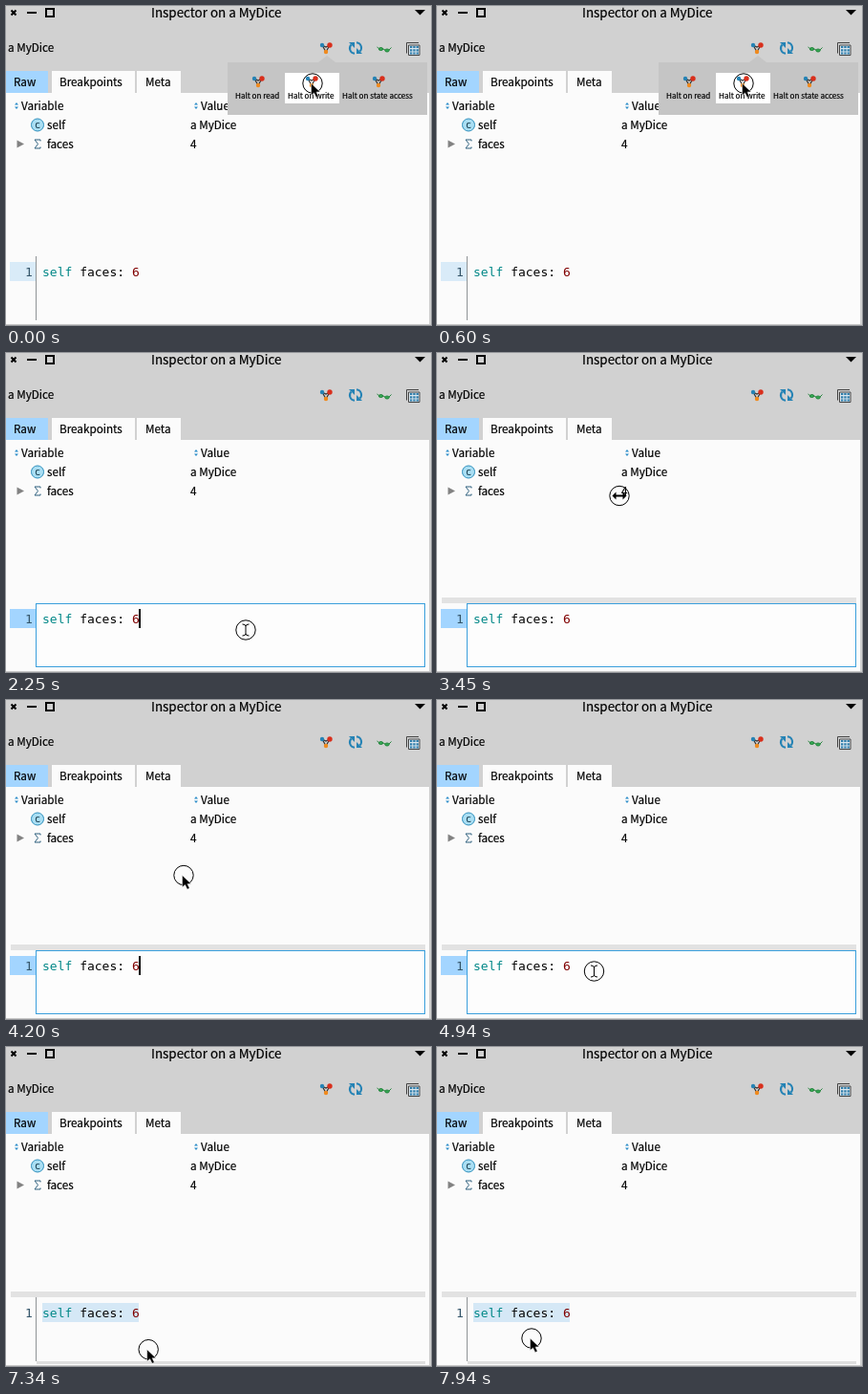
Recreate the animation shown at these times as an HTML page. Size 445 px wide and 334 px high, loop 8 s.

```html
<!DOCTYPE html>
<html lang="en">
<head>
<meta charset="utf-8">
<title>Inspector</title>
<style>
html, body { margin: 0; width: 100%; height: 100%; overflow: hidden; background: #d1d1d1; }
svg { display: block; width: 445px; height: 334px; }
text {
  font: 11.7px "Noto Sans CJK JP", "Noto Sans CJK SC", "Noto Sans CJK", "Open Sans", sans-serif;
  fill: #000; stroke: #000; stroke-width: .2px; white-space: pre;
}
text.title { font-size: 13.4px; }
text.small { font-size: 8.1px; }
text.code { font: 13px "DejaVu Sans Mono", "Noto Sans Mono", monospace; stroke: none; }
</style>
</head>
<body>
<svg viewBox="0 0 445 334">
  <defs>
    <g id="halt" fill="none">
      <path d="M-4-3 0 4 4-3M-4-3 0-1 4-3" stroke="#333" stroke-width="1.2"/>
      <circle cx="-4" cy="-3" r="2.2" fill="#2583b5"/>
      <circle cx="4" cy="-3" r="2.7" fill="#d92f1c"/>
      <circle cx="0" cy="4" r="2.2" fill="#f08a1d"/>
    </g>
    <path id="sort" d="M-2-1 0-3.500 2-1zM-2 1 0 3.500 2 1z" fill="#2f8fca"/>
    <path id="turn" d="M-1 5.800A5.500 5.500 0 0 1-4.500-3.500" fill="none" stroke="#2583b5" stroke-width="2"/>
    <path id="turnHead" d="M-7-6h6v6z" fill="#2583b5"/>
  </defs>

  <rect width="445" height="334" fill="#d1d1d1"/>
  <path d="M5.500 4.500l5 5m0-5-5 5M22 7h10" stroke="#000" stroke-width="2"/>
  <rect x="42" y="3" width="8" height="8" fill="none" stroke="#000" stroke-width="2"/>
  <path d="M428 4h11l-5.500 5.500z"/>
  <text class="title" x="152" y="12">Inspector on a MyDice</text>
  <text x="2" y="48">a MyDice</text>

  <use href="#halt" x="335" y="44"/>
  <g transform="translate(366 44)">
    <use href="#turn"/><use href="#turnHead"/>
    <g transform="rotate(180)"><use href="#turn"/><use href="#turnHead"/></g>
  </g>
  <g transform="translate(396 45)" fill="#35a853" stroke="#27853f">
    <ellipse cx="-3.500" cy="0" rx="2.200" ry="1.500"/>
    <ellipse cx="3" cy="1.500" rx="2.200" ry="1.500"/>
    <path d="M-1 0 1 1M-5.500-.500l-2-1.500M5 1l2.500-2.500" fill="none"/>
  </g>
  <g transform="translate(426 44.500)" fill="none">
    <path d="M-6.500 5V-6H6" stroke="#444"/>
    <path d="M-4.500-3.500H7V7H-4.500z" fill="#d9e6ee" stroke="#444"/>
    <path d="M-3-1.500H6M-3 1.800H6M-3 5H6" stroke="#2c7ba9" stroke-width="2.200" stroke-dasharray="2.300 1"/>
  </g>

  <rect y="68" width="44" height="23" fill="#a3d5ff"/>
  <path d="M48 68h87v23H48zM137 68h46v23h-46zM0 91h443v242H0z" fill="#fbfbfb"/>
  <text x="8" y="84">Raw</text>
  <text x="56" y="84">Breakpoints</text>
  <text x="146" y="84">Meta</text>

  <rect id="row" x="5" y="135" width="434" height="20" fill="#d3d3d3"/>
  <use href="#sort" x="11" y="104.500"/>
  <use href="#sort" x="199" y="104.500"/>
  <text x="16" y="109">Variable</text>
  <text x="204" y="109">Value</text>
  <circle cx="33" cy="124.500" r="6.500" fill="#a9def3" stroke="#2d8fbd"/>
  <text class="small" x="33" y="127.700" text-anchor="middle" style="fill:#14506e">C</text>
  <text x="43" y="129">self</text>
  <text x="193" y="129">a MyDice</text>
  <path d="M11.500 140.500v8l7.500-4z" fill="#828282"/>
  <path d="M36 141.500v-1.500h-6l3.500 4.500-3.500 4.500h6v-1.500" fill="none" stroke="#2c5f7d"/>
  <text x="43" y="149">faces</text>
  <text x="193" y="149">4</text>

  <rect id="splitter" x="5" y="256" width="434" height="6" fill="#e2e2e2"/>
  <rect id="gutter" x="4" y="268" width="27" height="20"/>
  <path id="edge" d="M31.500 262v67" stroke="#8f9396"/>
  <rect id="focus" x="31.500" y="262.500" width="407" height="66" fill="#fff" fill-opacity=".4" stroke="#3a9fdc"/>
  <rect id="selection" y="268" height="20"/>
  <text class="code" x="20" y="283" style="fill:#34556a">1</text>
  <text class="code" x="38" y="283"><tspan fill="#008787">self</tspan> faces: <tspan fill="#800000">6</tspan></text>
  <rect id="caret" x="139" y="268" width="2" height="20"/>
  <rect id="bottomBar" x="32" y="329" width="407" height="3" fill="#dedede"/>
  <path d="M0 333.500h445" stroke="#c9c9c9"/>

  <g id="popup">
    <path d="M232 59h95l9-7 9 7h96v55H232z" fill="#c5c5c5"/>
    <rect id="button" x="292" y="70" width="57" height="32"/>
    <use href="#halt" x="264" y="79"/>
    <use href="#halt" x="320" y="79"/>
    <use href="#halt" x="390" y="79"/>
    <text class="small" x="240" y="97">Halt on read</text>
    <text class="small" x="295" y="97">Halt on write</text>
    <text class="small" x="352" y="97">Halt on state access</text>
  </g>

  <g id="pointer">
    <circle r="10.200" fill="none" stroke="#000"/>
    <path id="arrow" d="M-1.500 0v12.500l3-2.600 2.300 4.800 2.400-1.100-2.300-4.600h4z" stroke="#fff" stroke-width=".5"/>
    <path id="beam" d="M-3.500-6q3.500 0 3.500 2 0-2 3.500-2M0-5V5M-3.500 6q3.500 0 3.500-2 0 2 3.500 2" fill="none" stroke="#000"/>
    <path id="resize" d="M-7.500 0l4-4v3h7v-3l4 4-4 4V1h-7v3z"/>
  </g>
</svg>
<script>
const LOOP = 8000;
const STEP = 150;
const $ = id => document.getElementById(id);

const home = { x: 321, y: 81 };
const strokes = [
  { start: 1050, end: 1500, x: 304.5, y: 153 },  // leave the popup
  { start: 1500, end: 1950, x: 251, y: 290 },    // down into the editor
  { start: 2700, end: 3450, x: 191, y: 149.5 },  // up to the column edge
  { start: 3450, end: 3750, x: 198, y: 145 },
  { start: 4050, end: 4650, x: 150, y: 299 },    // back to the editor
  { start: 4650, end: 4940, x: 164.5, y: 284 },
  { start: 5090, end: 5690, x: 40, y: 284 },     // drag the selection
  { start: 5840, end: 6140, x: 69.5, y: 284 },
  { start: 7040, end: 7490, x: 189, y: 333 },    // out and back
  { start: 7490, end: 7940, x: 99, y: 305 }
];

const within = (t, from, to) => t >= from && t < to;
const show = (id, on) => $(id).setAttribute("visibility", on ? "inherit" : "hidden");

function quantize(t) {
  const shift = t < 4940 ? 0 : 140;
  return Math.floor((t - shift) / STEP) * STEP + shift;
}

function pointerAt(t) {
  return strokes.reduce((from, { start, end, x, y }) => {
    const p = Math.min(1, Math.max(0, (t - start) / (end - start)));
    return { x: from.x + (x - from.x) * p, y: from.y + (y - from.y) * p };
  }, home);
}

function pointerShape(t, y) {
  if (within(t, 3450, 3600)) return "resize";
  return within(t, 2250, 7190) && y > 262 ? "beam" : "arrow";
}

function render(t) {
  const { x, y } = pointerAt(quantize(t));
  const shape = pointerShape(t, y);
  $("pointer").setAttribute("transform", `translate(${x} ${y})`);
  for (const id of ["arrow", "beam", "resize"]) show(id, id === shape);

  show("popup", t < 2100);
  show("button", t < 1200);
  $("button").setAttribute("fill", within(t, 300, 450) ? "#dcdcdc" : "#fff");
  show("row", within(y, 135, 155) && shape === "arrow");

  const focused = within(t, 2100, 6740);
  const selecting = t >= 5240;
  show("focus", focused);
  show("edge", !focused);
  show("splitter", t >= 3000);
  show("bottomBar", t >= 6740);
  show("caret", within(t, 2100, 2850) || within(t, 3900, 4350));
  show("gutter", !selecting);
  $("gutter").setAttribute("fill", focused ? "#a3d5ff" : "#d9ebf8");

  const start = t >= 5690 ? 38 : Math.min(x, 139);
  show("selection", selecting);
  $("selection").setAttribute("x", start);
  $("selection").setAttribute("width", 139 - start);
  $("selection").setAttribute("fill", focused ? "#a3d5ff" : "#d5e8f6");
}

function tick() {
  render(performance.now() % LOOP);
  requestAnimationFrame(tick);
}
tick();
</script>
</body>
</html>
```
